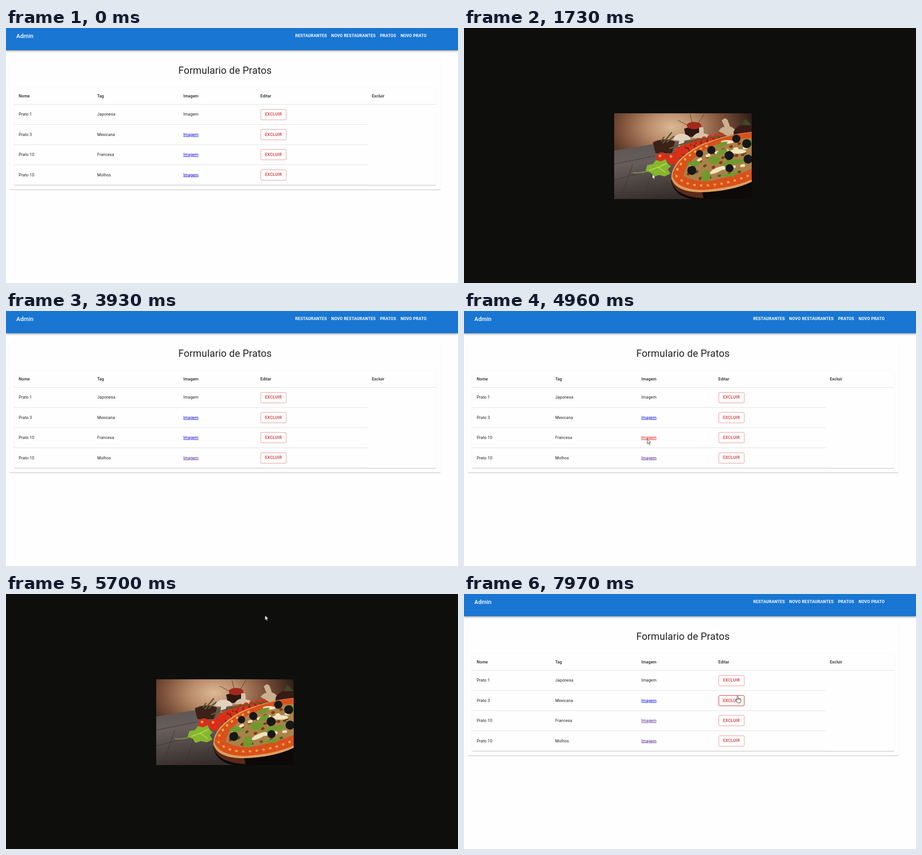
Animation of 996 by 562 pixels, one loop 8 s. Source, as an HTML page:

```html
<!DOCTYPE html>
<html lang="pt">
<head>
<meta charset="utf-8">
<title>Admin</title>
<style>
html, body { margin: 0; width: 100%; height: 100%; overflow: hidden; background: #fff; }
#stage { position: relative; width: 996px; height: 562px; overflow: hidden; background: #fefefe; }
#stage > * { position: absolute; }
svg { left: 0; top: 0; width: 996px; height: 562px; }

.bar {
  left: 0; top: 0; width: 996px; height: 49px; background: #1976d2;
  box-shadow: 0 1.3px 2.6px -.6px rgba(0,0,0,.2), 0 2.6px 3.2px rgba(0,0,0,.14), 0 .6px 6.4px rgba(0,0,0,.12);
}
.paper {
  background: #fefefe; border-radius: 2.6px;
  box-shadow: 0 1.3px .6px -.6px rgba(0,0,0,.2), 0 .6px .6px rgba(0,0,0,.14), 0 .6px 1.9px rgba(0,0,0,.12);
}
.card { left: 8px; top: 70px; width: 950px; height: 286px; }
.table { left: 18px; top: 131px; width: 930px; height: 215px; }

text { font: 400 8.96px Roboto, Arial, sans-serif; letter-spacing: .096px; fill: rgba(0,0,0,.87); }
.title { font-size: 21.76px; letter-spacing: .16px; text-anchor: middle; }
.brand { font-size: 12.8px; font-weight: 500; fill: #fff; }
.nav text { font-weight: 600; letter-spacing: .24px; fill: #fff; }
.head text { font-weight: 500; }
.link { fill: #00e; text-decoration: underline; }
.lines { stroke: #e0e0e0; stroke-width: 1; fill: none; }
.btn rect { width: 56px; height: 23px; rx: 2.4px; fill: rgba(211,47,47,0); stroke: rgba(211,47,47,.5); stroke-width: 1; }
.btn text { font-weight: 500; letter-spacing: .256px; fill: #d32f2f; }

/* all timings are shares of one 8 s loop */
.link3, .link4, .tab, .photo, .arrow, .hand { animation: 8s step-end infinite; }
.link3 { animation-name: link3; }
.link4 { animation-name: link4; }
.tab { animation-name: tab; }
.photo { animation-name: photo; }
.arrow { animation-name: arrow; }
.hand { animation-name: hand; }
.btn2 rect { animation: btn2 8s linear infinite; }
.btn3 rect { animation: btn3 8s linear infinite; }
.cursor { animation: move 8s linear infinite; }

@keyframes link3 { 0% { fill: #00e } 60.75% { fill: #f00 } 62.4%, 100% { fill: #551a8b } }
@keyframes link4 { 0% { fill: #00e } 18.1% { fill: #f00 } 20.69%, 100% { fill: #551a8b } }
@keyframes tab {
  0% { opacity: 0; fill: #3b3b3b }
  20.69% { opacity: 1; fill: #3b3b3b }
  21.56% { opacity: 1; fill: #0e0e0c }
  49.06% { opacity: 0; fill: #3b3b3b }
  62.4% { opacity: 1; fill: #3b3b3b }
  64.56% { opacity: 1; fill: #0e0e0c }
  79.56%, 100% { opacity: 0; fill: #3b3b3b }
}
@keyframes photo {
  0%, 49.06%, 79.56%, 100% { opacity: 0 }
  21.56%, 64.56% { opacity: 1 }
}
@keyframes hand {
  0%, 19.75%, 61.5%, 90.3%, 96.3%, 100% { opacity: 0 }
  12.8%, 59.4%, 89%, 95.2%, 97.5% { opacity: 1 }
}
@keyframes arrow {
  0%, 19.75%, 61.5%, 90.3%, 96.3%, 100% { opacity: 1 }
  12.8%, 59.4%, 89%, 95.2%, 97.5% { opacity: 0 }
}
@keyframes btn2 {
  0%, 97.5% { stroke: rgba(211,47,47,.5); fill: rgba(211,47,47,0) }
  99.2%, 100% { stroke: rgba(211,47,47,1); fill: rgba(211,47,47,.04) }
}
@keyframes btn3 {
  0%, 95.2%, 98.8%, 100% { stroke: rgba(211,47,47,.5); fill: rgba(211,47,47,0) }
  96.4% { stroke: rgba(211,47,47,.9); fill: rgba(211,47,47,.04) }
}
@keyframes move {
  0%, .8% { transform: translate(930px,566px) }
  .9% { transform: translate(929px,548px) }
  3% { transform: translate(905px,330px) }
  5% { transform: translate(830px,187px) }
  6.2% { transform: translate(740px,206px) }
  8% { transform: translate(590px,256px) }
  9.6% { transform: translate(450px,288px); animation-timing-function: ease-out }
  10.75%, 11.4% { transform: translate(413px,297px); animation-timing-function: ease-in-out }
  13.1%, 22.4% { transform: translate(415px,322px); animation-timing-function: ease-in }
  25.5% { transform: translate(560px,215px) }
  28.1% { transform: translate(726px,91px) }
  32% { transform: translate(850px,40px); animation-timing-function: ease-out }
  37.2% { transform: translate(946px,-20px) }
  49.4% { transform: translate(700px,-20px) }
  54.5% { transform: translate(560px,140px) }
  57.5% { transform: translate(450px,245px); animation-timing-function: ease-out }
  60%, 64.8% { transform: translate(404px,282px); animation-timing-function: ease-in }
  69.5% { transform: translate(507px,188px) }
  72.1% { transform: translate(601px,-20px) }
  80% { transform: translate(944px,-20px) }
  84% { transform: translate(890px,44px); animation-timing-function: ease-in-out }
  89.6%, 90% { transform: translate(915px,15px); animation-timing-function: ease-in-out }
  96% { transform: translate(602px,272px); animation-timing-function: ease-in-out }
  98.9%, 100% { transform: translate(603px,225px) }
}
</style>
</head>
<body>
<div id="stage">
  <div class="paper card"></div>
  <div class="paper table"></div>
  <div class="bar"></div>
  <svg viewBox="0 0 996 562">
    <defs>
      <radialGradient id="wall" cx=".42" cy=".16" r=".6">
        <stop offset="0" stop-color="#dcb896"/><stop offset=".3" stop-color="#b98b69"/>
        <stop offset=".62" stop-color="#7c503a"/><stop offset="1" stop-color="#2b1a14"/>
      </radialGradient>
      <linearGradient id="wood" x2=".3" y2="1">
        <stop offset="0" stop-color="#57504e"/><stop offset=".45" stop-color="#675e5b"/><stop offset="1" stop-color="#352d2b"/>
      </linearGradient>
      <clipPath id="frame"><rect x="331.5" y="188" width="302.5" height="189"/></clipPath>
    </defs>

    <text class="brand" x="22.8" y="21.5">Admin</text>
    <g class="nav">
      <text x="637.2" y="19.9">RESTAURANTES</text>
      <text x="716.6" y="19.9">NOVO RESTAURANTES</text>
      <text x="824.2" y="19.9">PRATOS</text>
      <text x="869.4" y="19.9">NOVO PRATO</text>
    </g>
    <text class="title" x="482.6" y="101">Formulario de Pratos</text>

    <path class="lines" d="M18 168.3H948M18 212.7H797M18 257.1H797M18 301.5H797M18 345.9H797"/>
    <g class="head">
      <text x="28" y="152.8">Nome</text><text x="201" y="152.8">Tag</text>
      <text x="390.8" y="152.8">Imagem</text><text x="560.6" y="152.8">Editar</text>
      <text x="806.2" y="152.8">Excluir</text>
    </g>
    <g>
      <text x="28" y="193.4">Prato 1</text><text x="201" y="193.4">Japonesa</text>
      <text x="390.8" y="193.4">Imagem</text>
      <text x="28" y="237.8">Prato 3</text><text x="201" y="237.8">Mexicana</text>
      <text class="link" x="390.8" y="237.8">Imagem</text>
      <text x="28" y="282.2">Prato 10</text><text x="201" y="282.2">Francesa</text>
      <text class="link link3" x="390.8" y="282.2">Imagem</text>
      <text x="28" y="326.5">Prato 10</text><text x="201" y="326.5">Molhos</text>
      <text class="link link4" x="390.8" y="326.5">Imagem</text>
    </g>
    <g class="btn"><rect x="561.5" y="179.5"/><text x="570.8" y="193.1">EXCLUIR</text></g>
    <g class="btn btn2"><rect x="561.5" y="223.5"/><text x="570.8" y="237.5">EXCLUIR</text></g>
    <g class="btn btn3"><rect x="561.5" y="267.5"/><text x="570.8" y="281.9">EXCLUIR</text></g>
    <g class="btn"><rect x="561.5" y="312.5"/><text x="570.8" y="326.2">EXCLUIR</text></g>

    <rect class="tab" width="996" height="562"/>
    <g class="photo" clip-path="url(#frame)">
      <rect x="331" y="188" width="304" height="190" fill="url(#wall)"/>
      <path d="M331 270L430 254L634 232V378H331Z" fill="url(#wood)"/>
      <path d="M331 300L420 282M331 335L440 306M345 377L372 300M395 377L412 325M440 377L448 335" stroke="#3d3431" fill="none"/>
      <!-- bowls, mushrooms, tomatoes -->
      <path d="M485 222Q506 214 529 220L523 240H489Z" fill="#2d1712"/>
      <ellipse cx="507" cy="215" rx="16" ry="8" fill="#a3281c"/>
      <path d="M471 203L492 214M498 190L503 210M529 190L515 212" stroke="#4a3c22" fill="none"/>
      <path d="M416 252Q440 240 465 250L458 276H422Z" fill="#3c2118"/>
      <path d="M438 254L458 230M446 252L464 238M434 250L441 240" stroke="#5d5836" stroke-width="3" fill="none"/>
      <path d="M460 246Q466 232 482 233Q499 236 499 246L486 248L482 261H472L474 248Z" fill="#e2d3bf"/>
      <path d="M502 242Q512 230 518 231V219H528V232Q542 234 545 243Z" fill="#d8c3a8"/>
      <path d="M561 227Q568 217 574 218L568 204Q575 195 581 203L586 217Q598 220 600 233L580 238Z" fill="#cbb08f"/>
      <path d="M594 229Q600 212 634 208V236Q610 242 594 236Z" fill="#3a1a17"/>
      <path d="M612 214L620 200L634 214Z" fill="#3d4a22"/>
      <path d="M464 276Q505 244 572 238L566 262L480 292Z" fill="#7a2314"/>
      <g stroke="#d8321a" stroke-linecap="round" fill="none">
        <path d="M470 270Q505 246 568 237" stroke-width="12" stroke-dasharray="0 13"/>
        <path d="M476 280Q505 260 545 250" stroke-width="13" stroke-dasharray="0 15"/>
      </g>
      <path d="M452 266Q500 246 572 238" stroke="#5c5a2b" stroke-width="3" fill="none"/>
      <g fill="#d92f17">
        <circle cx="436" cy="286" r="12"/><circle cx="460" cy="288" r="13"/><circle cx="475" cy="275" r="9"/>
      </g>
      <circle cx="432" cy="282" r="3" fill="#f58a67"/><circle cx="456" cy="283" r="3" fill="#f58a67"/>
      <!-- pizza on its board -->
      <path d="M456 336Q464 374 510 378H634V330Z" fill="#0c0908"/>
      <path d="M457 336Q465 372 528 375L524 360Z" fill="#5b2a1b"/>
      <path d="M634 229Q574 235 520 258Q456 292 457 331Q466 362 524 362Q590 360 634 339Z" fill="#dda05c"/>
      <path d="M634 230Q575 236 522 260Q462 293 459 327Q470 356 524 357Q588 354 634 334Z" fill="#d9501c"/>
      <path d="M634 242Q570 246 525 272Q486 300 484 326Q518 345 560 333Q600 325 634 311Z" fill="#a98248"/>
      <!-- scattered cheese and sauce -->
      <g fill="none" stroke-linecap="round">
        <path d="M468 326Q490 352 545 346Q590 342 632 323" stroke="#f0a23e" stroke-width="5" stroke-dasharray="1 14"/>
        <path d="M470 312Q488 278 540 258" stroke="#f0a845" stroke-width="5" stroke-dasharray="1 13"/>
        <path d="M494 322Q510 284 628 248M520 332Q560 290 630 272" stroke="#8f3516" stroke-width="6" stroke-dasharray="2 17"/>
        <path d="M500 304Q540 268 628 264M530 322Q560 308 628 302" stroke="#efe2bd" stroke-width="6" stroke-dasharray="5 16"/>
        <path d="M512 318Q560 276 626 280M540 330L622 314" stroke="#4c5224" stroke-width="5" stroke-dasharray="3 19"/>
      </g>
      <g fill="#f0e3c0">
        <ellipse cx="558" cy="313" rx="18" ry="5" transform="rotate(-25 558 313)"/>
        <ellipse cx="604" cy="272" rx="18" ry="5"/><ellipse cx="580" cy="251" rx="14" ry="4"/>
      </g>
      <g fill="#6f9a2e">
        <path d="M490 300Q505 287 523 297Q510 310 490 300Z"/><path d="M523 336Q522 316 533 313Q550 322 538 338Z"/>
        <path d="M567 304Q579 285 622 291Q602 304 567 304Z"/><path d="M537 294Q546 276 563 285Q568 299 550 300Z"/>
        <path d="M555 281Q562 262 581 268Q574 281 555 281Z"/><path d="M553 264Q564 248 581 251Q575 264 553 264Z"/>
        <path d="M606 258L634 244V258Z"/><path d="M560 326L606 316L594 328Z"/>
      </g>
      <g fill="#17171a">
        <circle cx="502" cy="314" r="10"/><circle cx="519" cy="277" r="8"/><circle cx="545" cy="269" r="9"/>
        <circle cx="600" cy="244" r="9"/><circle cx="623" cy="255" r="10"/><circle cx="584" cy="281" r="10"/>
        <circle cx="626" cy="289" r="10"/><circle cx="585" cy="309" r="9"/>
      </g>
      <path d="M372 319Q392 321 410 313" stroke="#83994a" stroke-width="2" fill="none"/>
      <path d="M400 315L404 302L416 300L423 291L434 294L444 289L449 299L456 305L449 311L455 321L442 327L430 324L417 328L412 319Z" fill="#86b52e"/>
      <path d="M408 314L430 306L447 298M428 307L444 318" stroke="#b4d75a" stroke-width="2" fill="none"/>
    </g>

    <g class="cursor" stroke="#111" stroke-width=".8" stroke-linejoin="round" fill="#fff">
      <path class="arrow" d="M0 0V10.6L2.4 8.4L4.1 12.2L5.9 11.4L4.2 7.7H7.5Z"/>
      <path class="hand" d="M-1.2 9.3V1.2Q-1.1 0 0 0T1.2 1.2V5Q2.4 4.2 3.4 5.2Q4.6 4.6 5.3 5.7Q6.8 5.4 6.9 7V10.5Q6.8 12.5 5.7 15H-.1Q-1.3 12.8-3.4 10.3Q-4.4 8.8-3.6 8.1T-1.2 9.3ZM1.2 5V8M3.4 5.4V8M5.3 5.9V8"/>
    </g>
  </svg>
</div>
</body>
</html>
```
